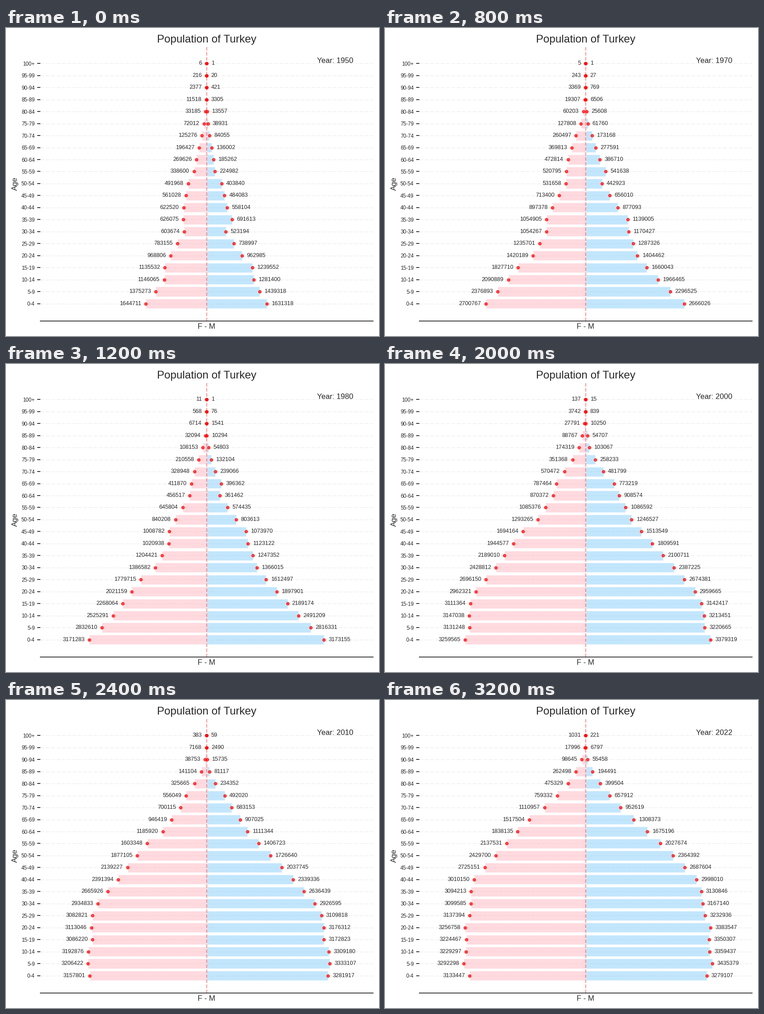
A matplotlib script that plays this animation: 825x679 px, repeating every 3.6 s.

```python
import matplotlib.pyplot as plt
import numpy as np
from matplotlib.animation import FuncAnimation

W, H, DPI = 825, 679, 100
LEFT, RIGHT, TOP, BOTTOM = 75.5, 811.5, 40.3, 645.6
LIMIT = 4.5e6
GAP = 125000
INK = "0.15"

plt.rcParams.update({
    "font.family": "Liberation Sans", "font.size": 12,
    "text.color": INK, "axes.labelcolor": INK, "axes.edgecolor": INK,
    "xtick.color": INK, "ytick.color": INK, "axes.linewidth": 1.25,
})

years = [*range(1950, 2021, 10), 2022]
ages = np.arange(0, 101, 5)
rows = np.arange(len(ages))
names = [f"{a}-{a + 4}" for a in ages[:-1]] + ["100+"]

# Turning points of cohort size: birth year, women, men (thousands)
BORN, WOMEN, MEN = np.transpose([
    (1850, 450, 385), (1880, 390, 385), (1895, 470, 350),
    (1900, 610, 540), (1910, 680, 630), (1915, 660, 745),
    (1920, 620, 545), (1930, 955, 955), (1935, 1095, 1200),
    (1940, 1075, 1205), (1950, 1410, 1400), (1955, 1790, 1630),
    (1970, 2460, 2430), (1982, 3070, 3080), (1988, 3140, 3200),
    (1995, 3095, 3185), (2002, 3240, 3370), (2010, 3160, 3285),
    (2017, 3200, 3340), (2022, 3000, 3140),
])


def population(year, sizes, shorter):
    """Cohort size, plus an excess of children, thinned by mortality."""
    born = year - ages
    d = born - 1900
    lifespan = np.maximum(73 + 0.24 * d + 0.0008 * d ** 2, 67) - shorter
    hazard = np.exp((ages - lifespan) / 15) + np.exp((ages - 94) / 7)
    excess = np.interp(year, [1950, 1970, 1990, 2010, 2022],
                       [0.17, 0.10, 0.04, 0, 0.045])
    young = 1 + excess * np.exp(-ages / 12)
    size = 1000 * np.interp(born, BORN, sizes)
    return np.ceil(size * young * np.exp(-hazard))


fig = plt.figure(figsize=(W / DPI, H / DPI), dpi=DPI, facecolor="white")
ax = fig.add_axes([LEFT / W, 1 - BOTTOM / H,
                   (RIGHT - LEFT) / W, (BOTTOM - TOP) / H])
ax.set(xlim=(-LIMIT, LIMIT), ylim=(-1.44, 21.44), xticks=[])
ax.set_axisbelow(True)
ax.spines[["left", "top", "right"]].set_visible(False)
ax.set_yticks(rows, names, fontsize="x-small")
ax.tick_params(axis="y", length=5, width=1.25, pad=3.5)
ax.grid(axis="y", color="0.8", alpha=0.4, ls="-.", lw=0.8)
ax.set_title("Population of Turkey", fontsize=17.4)
ax.set_xlabel("F - M")
ax.set_ylabel("Age")
ax.axvline(0, color="red", alpha=0.4, ls="--", lw=1.5, zorder=1.5)
year_text = fig.text(687.7 / W, 1 - 77 / H, "", va="baseline")


class Side:
    """One half of the pyramid: bars, end dots and counts."""

    def __init__(self, sign, color, sizes, shorter):
        self.sign, self.sizes, self.shorter = sign, sizes, shorter
        self.bars = ax.barh(rows, 0 * rows, height=0.8, color=color,
                            edgecolor="white", lw=1, alpha=0.5)
        self.dots = ax.scatter(0 * rows, rows, s=20, lw=1, color="red",
                               alpha=0.7, zorder=3)
        ha = "left" if sign > 0 else "right"
        self.labels = [ax.text(0, y, "", ha=ha, va="center", fontsize=9)
                       for y in rows]

    def show(self, year):
        counts = population(year, self.sizes, self.shorter)
        ends = self.sign * counts
        self.dots.set_offsets(np.column_stack([ends, rows]))
        for bar, label, x, n in zip(self.bars, self.labels, ends, counts):
            bar.set_width(x)
            label.set_x(x + self.sign * GAP)
            label.set_text(f"{n:.0f}")


sides = [Side(-1, "lightpink", WOMEN, 0), Side(1, "lightskyblue", MEN, 4.5)]


def update(i):
    year_text.set_text(f"Year: {years[i]}")
    for side in sides:
        side.show(years[i])
    return []


anim = FuncAnimation(fig, update, frames=len(years), interval=400,
                     repeat=True, repeat_delay=0, blit=False)
plt.show()
```
